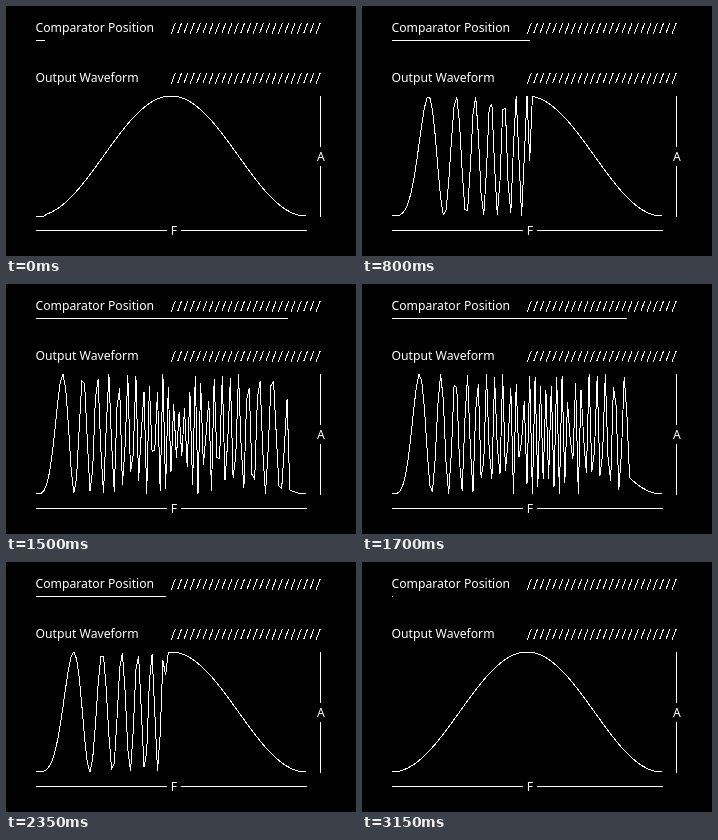
These frames come from a looping animation (350 by 250 pixels, 3200 ms). An HTML page:

```html
<!DOCTYPE html>
<html lang="en">
<head>
<meta charset="utf-8">
<title>Comparator and waveform</title>
<style>
html, body { margin: 0; width: 100%; height: 100%; overflow: hidden; background: #000; }
svg { display: block; }
text { fill: #fff; font: 12.2px "Noto Sans", "Open Sans", sans-serif; }
path { fill: none; stroke: #fff; shape-rendering: crispEdges; }
</style>
</head>
<body>
<svg width="350" height="250" viewBox="0 0 350 250">
  <text x="29.5" y="26">Comparator Position</text>
  <text x="29.5" y="76">Output Waveform</text>
  <text x="315" y="155" text-anchor="middle">A</text>
  <text x="168" y="229" text-anchor="middle">F</text>
  <path id="hatch"/>
  <path d="M314.5 90V141M314.5 160V211M30 224.5H161M175 224.5H301"/>
  <path id="bar"/>
  <path id="wave"/>
</svg>
<script>
const LEFT = 30, STEP = 2.7, SAMPLES = 100, FRAME = 50, FRAMES = 64;
const setPath = (id, d) => document.getElementById(id).setAttribute('d', d);

let hatch = '';
for (const y of [27.5, 77.5]) {
  for (let i = 0; i < 24; i++) hatch += `M${165.3 + i * 6.3} ${y}l4-10.5`;
}
setPath('hatch', hatch);

// A rising chirp up to the comparator position, a single cosine cycle after it.
function phase(i, pos) {
  return i <= pos
    ? Math.PI * pos * i * (i + 1) / 1e4
    : 2 * Math.PI * i / SAMPLES;
}

function draw(pos) {
  const points = [];
  for (let i = 0; i <= SAMPLES; i++) {
    const x = LEFT + i * STEP;
    const y = 150 + 60 * Math.cos(phase(i, pos));
    points.push(x.toFixed(2) + ' ' + y.toFixed(2));
  }
  setPath('wave', 'M' + points.join('L'));
  setPath('bar', `M${LEFT} 34.5h${Math.floor(pos * STEP) + 1}`);
}

function tick() {
  const n = Math.floor(performance.now() / FRAME) % FRAMES;
  draw(3 * (n < FRAMES / 2 ? n + 1 : FRAMES - 1 - n));
  requestAnimationFrame(tick);
}
tick();
</script>
</body>
</html>
```
